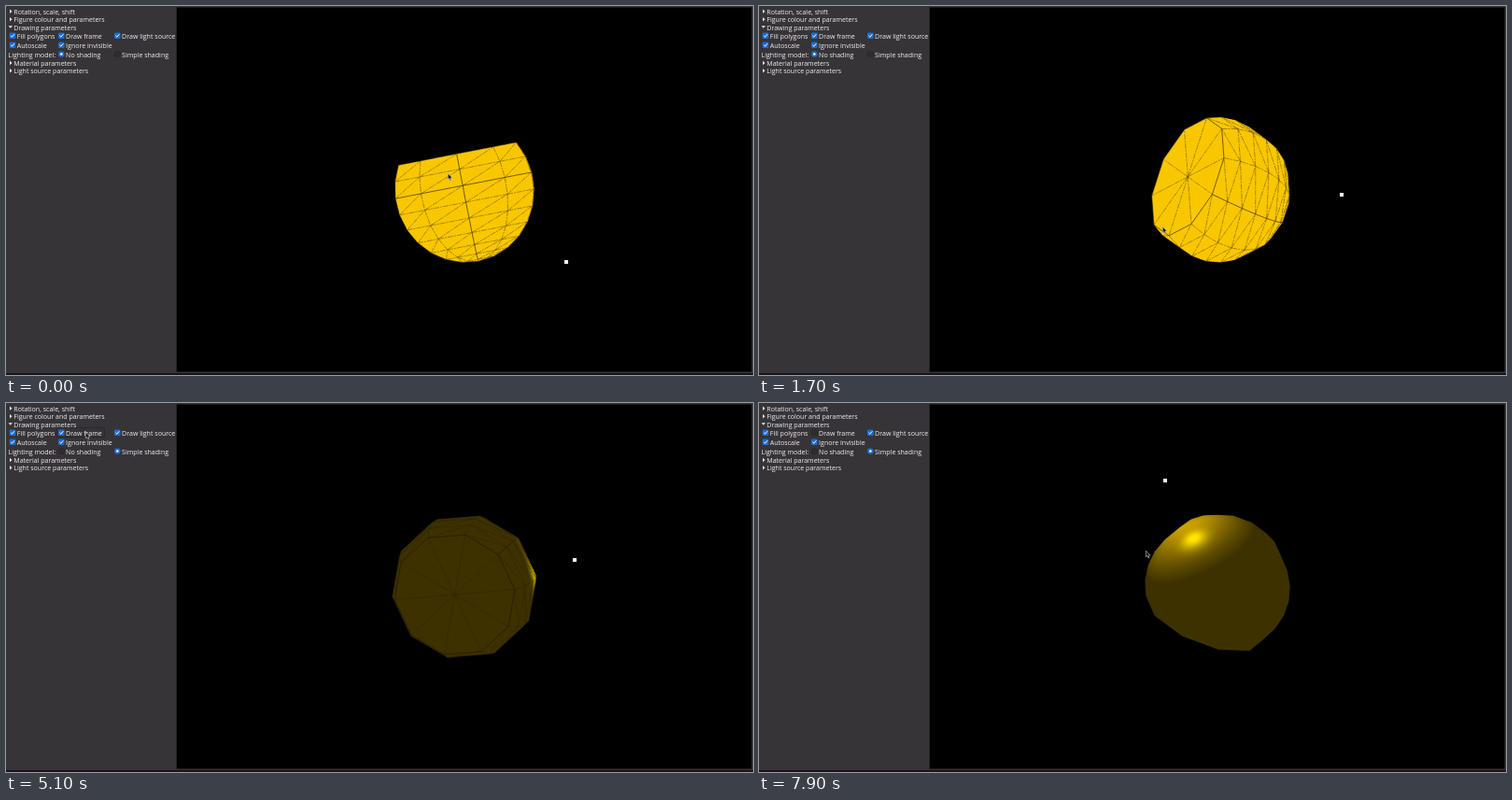
An HTML page with a canvas for the animation above (8 s loop, 800 by 395 pixels).

```html
<!DOCTYPE html>
<html lang="en">
<head>
<meta charset="utf-8">
<title>3D figure viewer</title>
<style>
html, body { margin: 0; width: 100%; height: 100%; overflow: hidden; background: #363436; }
canvas, svg, span { position: absolute; left: 0; top: 0; }
span { font: 7.05px/10px "Open Sans", "Noto Sans", sans-serif; color: #f0f0f0; white-space: pre; }
</style>
</head>
<body>
<canvas id="stage" width="800" height="395"></canvas>
<script>
const LOOP = 8000, STEP = 100;
const CX = 491, CY = 196.7, R = 78;
const SLICES = 10, STACKS = 9, TOP_LAT = 30.2 * Math.PI / 180;
const BASE = [249, 199, 0], AMBIENT = 0.245, DIFFUSE = 0.57;
const LIGHT_AXIS = -96.3, LIGHT_SIDE = 96.5;
const SHADE_AT = 4500, FRAME_OFF_AT = 5200;

const ctx = document.getElementById('stage').getContext('2d');
const ball = document.createElement('canvas');
const SIZE = ball.width = ball.height = 164;
const ballCtx = ball.getContext('2d');

// vectors: x right, y down, z towards the viewer
const dot = (a, b) => a[0] * b[0] + a[1] * b[1] + a[2] * b[2];
const cross = (a, b) => [a[1] * b[2] - a[2] * b[1], a[2] * b[0] - a[0] * b[2], a[0] * b[1] - a[1] * b[0]];
const mul = (a, s) => a.map(v => v * s);
const add = (...vs) => [0, 1, 2].map(i => vs.reduce((s, v) => s + v[i], 0));
const sub = (a, b) => add(a, mul(b, -1));
const unit = a => mul(a, 1 / Math.hypot(...a));

// basis from the cap normal and the direction of the light
function pose(cap, light) {
  const c = unit(cap);
  const p = unit(sub(light, mul(c, dot(light, c))));
  return [c, p, cross(p, c)];
}

const POSES = [
  [0, pose([-.19, -.98, 0], [110, 77, -29])],
  [800, pose([-.18, -.47, .87], [108, 12, -81])],
  [1700, pose([-.81, -.354, .47], [135, 4.5, 30])],
  [2700, pose([-.266, .215, .94], [117.5, -28.5, -63])],
  [6100, pose([-.266, .215, .94], [117.5, -28.5, -63])],
  [7000, pose([-.805, .317, -.5], [30, -23.5, 131])],
  [7900, pose([-.35, .835, -.42], [-52.5, -115.5, 50])]
];

const CURSOR = [
  [0, 473, 179], [800, 473, 231], [900, 472, 232], [1700, 432, 236],
  [2700, 463, 266], [3600, 533, 144], [4300, 128, 52], [4500, 128, 52],
  [5100, 85, 31], [5300, 85, 31], [6000, 531, 186], [6100, 537, 188],
  [7000, 449, 201], [7900, 414, 158]
];

function segment(keys, t) {
  let i = 0;
  while (i < keys.length - 2 && t >= keys[i + 1][0]) i++;
  const [a, b] = [keys[i], keys[i + 1]];
  return [a, b, Math.min(1, (t - a[0]) / (b[0] - a[0]))];
}

function turn(v, n, ang) {
  const c = Math.cos(ang);
  return add(mul(v, c), mul(cross(n, v), Math.sin(ang)), mul(n, dot(n, v) * (1 - c)));
}

function poseAt(t) {
  const [[, a], [, b], k] = segment(POSES, t);
  const axis = add(...a.map((v, i) => cross(v, b[i])));
  const len = Math.hypot(...axis);
  if (len < 1e-6) return a;
  const trace = a.reduce((s, v, i) => s + dot(v, b[i]), 0);
  const ease = (k + k * k * (3 - 2 * k)) / 2;
  return a.map(v => turn(v, mul(axis, 1 / len), Math.atan2(len, trace - 1) * ease));
}

function mesh([c, p, r]) {
  const step = (TOP_LAT + Math.PI / 2) / STACKS;
  const at = (i, k) => {
    const lat = TOP_LAT - i * step, az = k * 2 * Math.PI / SLICES;
    const s = R * Math.cos(lat);
    return add(mul(c, R * Math.sin(lat)), mul(p, s * Math.cos(az)), mul(r, s * Math.sin(az)));
  };
  const hub = mul(c, R * Math.sin(TOP_LAT));
  const cap = [], side = [], edges = [];
  // ring and meridian closest to the viewer are drawn stronger
  const nearRing = Math.max(0, Math.round((TOP_LAT - Math.asin(c[2])) / step));
  const nearSlice = (Math.round(Math.atan2(r[2], p[2]) / (2 * Math.PI / SLICES)) + SLICES) % SLICES;
  for (let k = 0; k < SLICES; k++) {
    cap.push([hub, at(0, k), at(0, k + 1)]);
    if (c[2] > 0.02) edges.push([hub, at(0, k), false]);
    for (let i = 0; i < STACKS; i++) {
      const a = at(i, k), b = at(i, k + 1), d = at(i + 1, k), e = at(i + 1, k + 1);
      side.push([a, b, d]);
      if (i < STACKS - 1) side.push([b, e, d]);
      const candidates = [[a, b, i === nearRing], [a, d, k === nearSlice]];
      if (i < STACKS - 1) candidates.push([d, b, false]);
      for (const g of candidates) {
        const capRim = i === 0 && g[1] === b && g[0] === a && c[2] > 0.02;
        if (capRim || g[0][2] + g[1][2] > 2) edges.push(g);
      }
    }
  }
  const front = tri => {
    const n = cross(sub(tri[1], tri[0]), sub(tri[2], tri[0]));
    return n[2] * dot(n, add(...tri)) > 0;
  };
  return { cap: cap.filter(front), side: side.filter(front), edges };
}

function trace(tris) {
  ctx.beginPath();
  for (const tri of tris) {
    tri.forEach((v, i) => ctx[i ? 'lineTo' : 'moveTo'](CX + v[0], CY + v[1]));
    ctx.closePath();
  }
}

function shadeBall(light) {
  const img = ballCtx.createImageData(SIZE, SIZE), h = SIZE / 2;
  for (let j = 0; j < SIZE; j++) for (let i = 0; i < SIZE; i++) {
    const x = i + .5 - h, y = j + .5 - h;
    const n = unit([x, y, Math.sqrt(Math.max(0, R * R - x * x - y * y))]);
    const l = unit(sub(light, mul(n, R)));
    const nl = dot(n, l);
    let power = AMBIENT, spec = 0;
    if (nl > 0) {
      power += nl * DIFFUSE;
      spec = Math.pow(Math.max(0, 2 * nl * n[2] - l[2]), 10) * 108 * Math.min(1, nl * 4);
    }
    img.data.set([BASE[0] * power + spec, BASE[1] * power + spec, 0, 255], (j * SIZE + i) * 4);
  }
  ballCtx.putImageData(img, 0, 0);
}

const rgb = k => `rgb(${BASE.map(v => Math.round(v * k))})`;

function drawFigure(t) {
  const basis = poseAt(t), { cap, side, edges } = mesh(basis);
  const light = add(mul(basis[0], LIGHT_AXIS), mul(basis[1], LIGHT_SIDE));
  const lamp = () => {
    ctx.fillStyle = '#fff';
    ctx.fillRect(Math.round(CX + light[0]) - 2, Math.round(CY + light[1]) - 2, 4, 4);
  };
  if (light[2] < 0) lamp();
  if (t < SHADE_AT) {
    trace([...cap, ...side]);
    ctx.fillStyle = rgb(1);
    ctx.fill();
  } else {
    shadeBall(light);
    ctx.save();
    trace([...cap, ...side]);
    ctx.clip();
    ctx.drawImage(ball, CX - SIZE / 2, CY - SIZE / 2);
    ctx.restore();
    trace(cap);
    ctx.fillStyle = rgb(AMBIENT);
    ctx.fill();
  }
  if (t < FRAME_OFF_AT) {
    for (const [a, b, strong] of edges) {
      ctx.beginPath();
      ctx.moveTo(CX + a[0], CY + a[1]);
      ctx.lineTo(CX + b[0], CY + b[1]);
      ctx.strokeStyle = strong ? 'rgba(30,22,0,.8)' : 'rgba(40,30,0,.7)';
      ctx.lineWidth = strong ? .75 : .55;
      ctx.setLineDash(strong ? [] : [6, 1, 2, 1]);
      ctx.stroke();
    }
    ctx.setLineDash([]);
  }
  if (light[2] >= 0) lamp();
}

// side panel
const HEADS = [
  ['Rotation, scale, shift', 5.7], ['Figure colour and parameters', 14.3], ['Drawing parameters', 22.5, true],
  ['Material parameters', 61], ['Light source parameters', 69.3]
];
const OPTIONS = [
  ['Fill polygons', 7, 31.7, 'check', () => true],
  ['Draw frame', 59.3, 31.7, 'check', t => t < FRAME_OFF_AT],
  ['Draw light source', 119.3, 31.7, 'check', () => true],
  ['Autoscale', 7, 41.7, 'check', () => true],
  ['Ignore invisible', 59.3, 41.7, 'check', () => true],
  ['No shading', 59.3, 51.5, 'radio', t => t < SHADE_AT],
  ['Simple shading', 119.3, 51.5, 'radio', t => t >= SHADE_AT]
];

function label(text, x, y) {
  const el = document.createElement('span');
  el.textContent = text;
  el.style.left = x + 'px';
  el.style.top = y - 5 + 'px';
  document.body.append(el);
  return el;
}
HEADS.forEach(([text, y]) => label(text, 8.3, y));
label('Lighting model:', 2.5, 51.5);
const widths = OPTIONS.map(([text, x, y]) => label(text, x + 4.8, y).offsetWidth);

function drawOption([, x, y, kind, state], width, t, mx, my) {
  const on = state(t);
  if (mx > x - 5 && mx < x + width + 8 && my > y - 5 && my < y + 5) {
    ctx.strokeStyle = '#282628';
    ctx.lineWidth = .8;
    ctx.strokeRect(x - 5, y - 5, Math.min(width + 12, 187 - x), 10);
  }
  ctx.beginPath();
  if (kind === 'check') ctx.roundRect(x - 3.3, y - 3.3, 6.6, 6.6, 1.2);
  else ctx.arc(x, y, 3.3, 0, 7);
  ctx.fillStyle = on ? '#1c6dd0' : '#2e2c2e';
  ctx.fill();
  if (!on) {
    ctx.strokeStyle = '#262426';
    ctx.lineWidth = .5;
    ctx.stroke();
    return;
  }
  ctx.beginPath();
  if (kind === 'check') {
    ctx.moveTo(x - 1.9, y + .1);
    ctx.lineTo(x - .5, y + 1.5);
    ctx.lineTo(x + 2, y - 1.5);
    ctx.strokeStyle = '#fff';
    ctx.lineWidth = 1;
    ctx.stroke();
  } else {
    ctx.arc(x, y, 1.3, 0, 7);
    ctx.fillStyle = '#fff';
    ctx.fill();
  }
}

function drawPanel(t, mx, my) {
  ctx.fillStyle = '#363436';
  ctx.fillRect(0, 0, 800, 395);
  ctx.fillStyle = '#1b1219';
  ctx.fillRect(0, 393, 800, 2);
  ctx.fillStyle = '#000';
  ctx.fillRect(182.7, 1.5, 615.8, 390);
  ctx.fillStyle = '#e8e8e8';
  for (const [, y, open] of HEADS) {
    ctx.beginPath();
    if (open) { ctx.moveTo(2.6, y - 1.2); ctx.lineTo(7, y - 1.2); ctx.lineTo(4.8, y + 1.3); }
    else { ctx.moveTo(4, y - 2.2); ctx.lineTo(6.5, y); ctx.lineTo(4, y + 2.2); }
    ctx.fill();
  }
  OPTIONS.forEach((o, i) => drawOption(o, widths[i], t, mx, my));
}

document.body.insertAdjacentHTML('beforeend',
  '<svg id="mouse" width="10" height="12" viewBox="-1 -1 10 12"><path d="M.3 .3V6.8L1.8 5.5 2.9 7.9 4 7.4 2.9 5.1H4.9Z" fill="#111" stroke="#ccc" stroke-width=".6"/></svg>');
const mouse = document.getElementById('mouse');

function draw(t) {
  const [a, b, k] = segment(CURSOR, t);
  const mx = a[1] + (b[1] - a[1]) * k, my = a[2] + (b[2] - a[2]) * k;
  drawPanel(t, mx, my);
  drawFigure(t);
  mouse.style.transform = `translate(${mx - 1}px, ${my - 1}px)`;
}

const start = performance.now();
let last = -1;
function tick() {
  const t = Math.floor((performance.now() - start) % LOOP / STEP) * STEP;
  if (t !== last) draw(last = t);
  requestAnimationFrame(tick);
}
tick();
</script>
</body>
</html>
```
